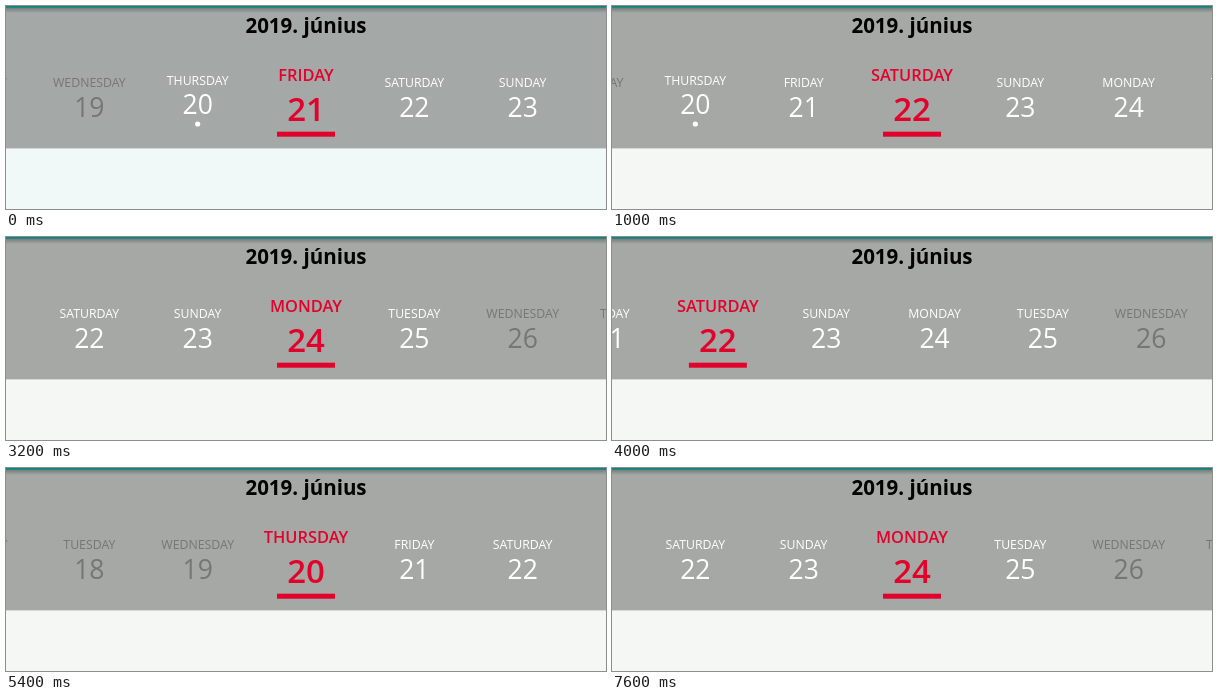
An HTML page with a canvas that plays this animation: 600 px wide and 203 px high, repeating every 8 s.

```html
<!DOCTYPE html>
<html lang="hu">
<head>
<meta charset="utf-8">
<title>Date strip</title>
<style>
  html, body { margin: 0; width: 100%; height: 100%; overflow: hidden; background: #f5f7f6; }
  canvas { display: block; }
</style>
</head>
<body>
<canvas id="stage" width="600" height="203"></canvas>
<script>
const ctx = document.getElementById('stage').getContext('2d');
const LOOP = 8000, TICK = 100, PITCH = 325 / 3, CENTER = 300;
const DAYS = ['SUNDAY', 'MONDAY', 'TUESDAY', 'WEDNESDAY', 'THURSDAY', 'FRIDAY', 'SATURDAY'];
const RED = '#e2032c', DIM = '#757675';
const FIRST_OPEN = 20, LAST_OPEN = 25, MARKED = 20;

// Each tap selects a day at once, then the strip scrolls to it.
const taps = [
  { at: 200, steps: 7, day: 22 },
  { at: 2800, steps: 5, day: 24 },
  { at: 4000, steps: 5, day: 22 },
  { at: 5000, steps: 5, day: 20 },
  { at: 6000, steps: 4, day: 22 },
  { at: 7200, steps: 5, day: 24 }
];

const smooth = p => p * p * (3 - 2 * p);

function stateAt(t) {
  let selected = 21, position = 21;
  for (const tap of taps) {
    if (t < tap.at) break;
    const p = Math.min(1, ((t - tap.at) / TICK + 1) / tap.steps);
    position += (tap.day - position) * smooth(p);
    selected = tap.day;
  }
  return { selected, position };
}

function write(text, x, baseline, size, weight, color) {
  ctx.font = `${weight} ${size}px "Open Sans", sans-serif`;
  ctx.fillStyle = color;
  ctx.fillText(text, x, baseline);
}

function drawDay(day, x, selected) {
  const name = DAYS[(day + 5) % 7]; // the 1st is a Saturday
  if (selected) {
    write(name, x, 74.7, 16.4, 600, RED);
    write(day, x, 114.8, 33, 600, RED);
    ctx.fillRect(x - 29, 125.7, 58, 5);
    return;
  }
  const open = day >= FIRST_OPEN && day <= LAST_OPEN;
  const color = open ? '#fff' : DIM;
  const lift = day === MARKED ? 2.7 : 0;
  write(name, x, 81.3 - lift, 12.3, 400, color);
  write(day, x, 110.7 - lift, 26.5, 400, color);
  if (day === MARKED) {
    ctx.beginPath();
    ctx.arc(x, 118, 2.6, 0, Math.PI * 2);
    ctx.fill();
  }
}

function drawBackground(started) {
  ctx.fillStyle = started ? '#f5f7f5' : '#f1f8f8';
  ctx.fillRect(0, 0, 600, 203);
  ctx.fillStyle = started ? '#a6a8a5' : '#a4a8a7';
  ctx.fillRect(0, 0, 600, 142.4);
  const shadow = ctx.createLinearGradient(0, 1, 0, 7);
  shadow.addColorStop(0, 'rgba(60,80,78,.55)');
  shadow.addColorStop(1, 'rgba(60,80,78,0)');
  ctx.fillStyle = shadow;
  ctx.fillRect(0, 1, 600, 6);
  ctx.fillStyle = '#06867c';
  ctx.fillRect(0, 0, 600, 1.6);
}

function draw(t) {
  const { selected, position } = stateAt(t);
  drawBackground(t >= taps[0].at);
  ctx.textAlign = 'center';
  write('2019. június', CENTER, 26.5, 20.5, 700, '#000');
  for (let day = Math.floor(position) - 3; day <= position + 4; day++) {
    drawDay(day, CENTER + (day - position) * PITCH, day === selected);
  }
}

const start = performance.now();
function frame() {
  const t = (performance.now() - start) % LOOP;
  draw(Math.floor(t / TICK) * TICK);
  requestAnimationFrame(frame);
}
frame();
</script>
</body>
</html>
```
